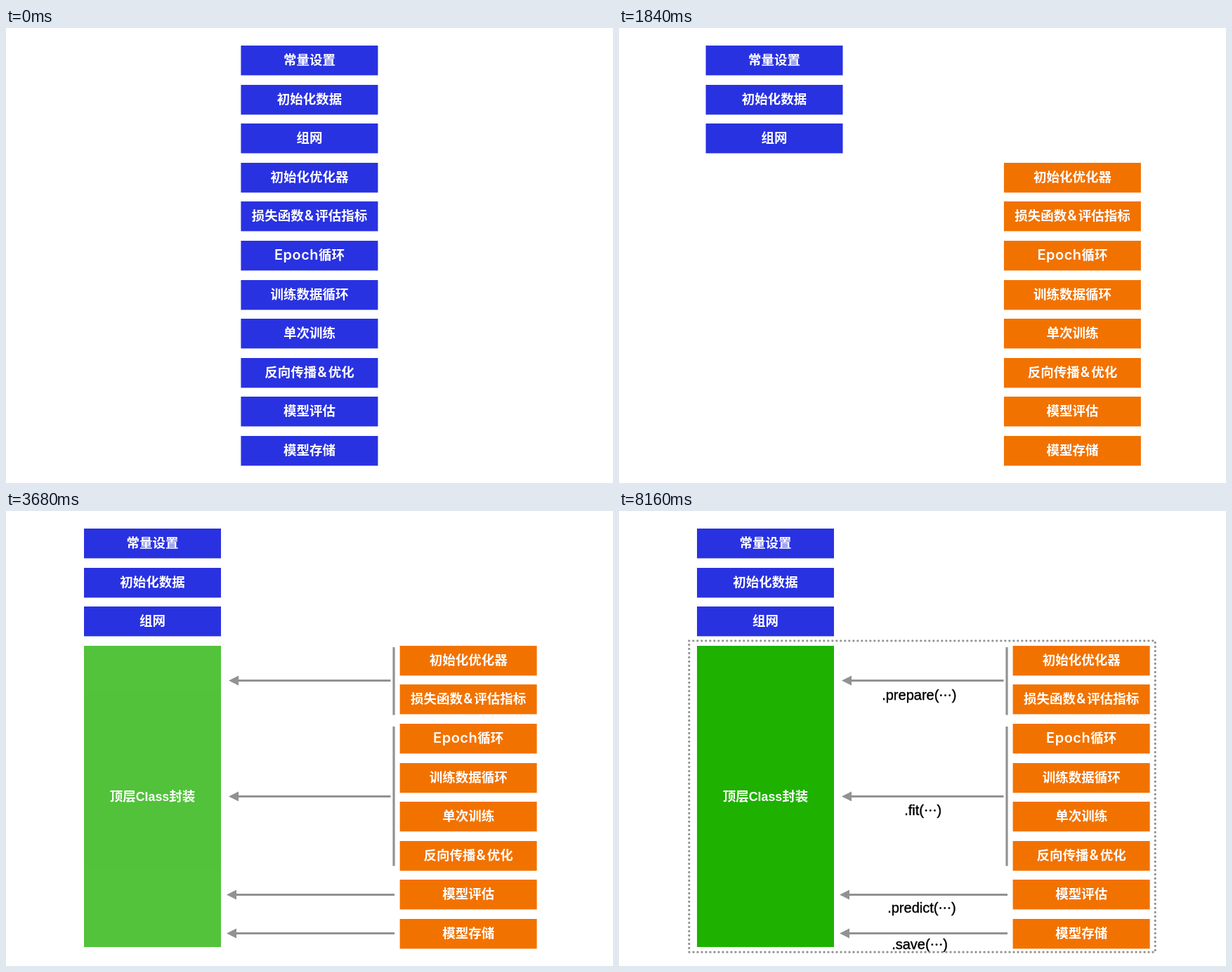
An HTML page that plays this animation: 864 by 648 pixels, repeating every 8680 ms.

```html
<!DOCTYPE html>
<html lang="zh-CN">
<head>
<meta charset="utf-8">
<title>训练流程封装</title>
<style>
  html, body { margin: 0; width: 100%; height: 100%; overflow: hidden; background: #fff; }
  svg { display: block; width: 864px; height: 648px; }
  text { font: 700 18.5px "Noto Sans CJK SC", "Noto Sans CJK", sans-serif; }
  .title { fill: #fff; text-anchor: middle; }
  .latin { font: 600 20px Inter, sans-serif; letter-spacing: .5px; }
  .amp { font: 600 20px Inter, sans-serif; letter-spacing: 2px; }
  .class { font: 700 17.8px "Liberation Sans", Arial, sans-serif; }
  .call { font: 400 20px "Liberation Sans", Arial, sans-serif; stroke: #000; stroke-width: .4px; }
  .dots { font: 700 18.5px "Noto Sans CJK SC", "Noto Sans CJK", sans-serif; stroke: none; }
</style>
</head>
<body>
<svg id="stage" viewBox="0 0 864 648" xmlns="http://www.w3.org/2000/svg"></svg>
<script>
const LOOP = 8680, STEP = 40, STEPS = 12;
const BLUE = '#2932e1', ORANGE = '#f27200', GREEN = '#1eb100', GRAY = '#929292';
const START = { recolor: 520, split: 1480, arrows: 2440, wrap: 3400, calls: 4360, frame: 5320 };
const BOX = { x: 334.4, w: 195, h: 42.4 };
const titles = ['常量设置', '初始化数据', '组网', '初始化优化器', '损失函数&评估指标', 'Epoch循环',
  '训练数据循环', '单次训练', '反向传播&优化', '模型评估', '模型存储'];
const stage = document.getElementById('stage');

function add(parent, tag, attrs = {}, content) {
  const el = document.createElementNS('http://www.w3.org/2000/svg', tag);
  for (const key in attrs) el.setAttribute(key, attrs[key]);
  if (content) el.textContent = content;
  parent.appendChild(el);
  return el;
}

// Text whose Latin runs get their own font class
function addTitle(parent, x, y, str, latin = 'latin') {
  const text = add(parent, 'text', { x, y, class: 'title' });
  for (const run of str.split(/([A-Za-z]+|&)/).filter(Boolean)) {
    const attrs = run === '&' ? { class: 'amp', dx: 1 } : /[a-z]/i.test(run) ? { class: latin } : {};
    add(text, 'tspan', attrs, run);
  }
}

// Group revealed through a moving clip edge
function addWipe(id, x, w, fromRight = false) {
  const clip = add(stage, 'clipPath', { id });
  const rect = add(clip, 'rect', { x, y: 0, width: 0, height: 648 });
  const group = add(stage, 'g', { 'clip-path': `url(#${id})` });
  const set = p => {
    rect.setAttribute('width', w * p);
    if (fromRight) rect.setAttribute('x', x + w * (1 - p));
  };
  return { group, set };
}

const boxTop = i => Math.round(25 + 55.6 * i);
const addBox = (parent, i, fill) =>
  add(parent, 'rect', { x: BOX.x, y: boxTop(i), width: BOX.w, height: BOX.h, fill });

// Stacked boxes
const upper = add(stage, 'g');
const lower = add(stage, 'g');
const lowerBlue = add(lower, 'g');
const recolor = addWipe('recolor', BOX.x - 1, BOX.w + 2);
lower.appendChild(recolor.group);
const lowerText = add(lower, 'g');
titles.forEach((title, i) => {
  const isUpper = i < 3;
  addBox(isUpper ? upper : lowerBlue, i, BLUE);
  if (!isUpper) addBox(recolor.group, i, ORANGE);
  addTitle(isUpper ? upper : lowerText, 432, boxTop(i) + 27.3, title);
});

// Arrows, two of them with a bracket bar: tip x, y, tail x, bar top, bar bottom
const arrows = [
  [317, 241.5, 547.5, 194, 290.5],
  [317, 406.5, 547.5, 307, 505.5],
  [314, 546.5, 553],
  [314, 601.5, 553]
].map(([tip, y, tail, top, bottom], i) => {
  const wipe = addWipe('arrow' + i, 313, 242, true);
  const line = { stroke: GRAY, 'stroke-width': 3.2, fill: 'none' };
  add(wipe.group, 'path', { d: `M${tip + 12} ${y}H${tail}`, ...line });
  add(wipe.group, 'path', { d: `M${tip} ${y}l14 -7v14z`, fill: GRAY });
  if (top) add(wipe.group, 'path', { d: `M552 ${top}V${bottom}`, ...line });
  return wipe;
});

// Green wrapper
const wrap = add(stage, 'g');
add(wrap, 'rect', { x: 111, y: 192, width: BOX.w, height: 429, fill: GREEN });
addTitle(wrap, 208.5, 413.3, '顶层Class封装', 'class');

// Method calls: name, x, baseline, width
const calls = [
  ['prepare', 374.2, 269, 107],
  ['fit', 406.2, 432.5, 54],
  ['predict', 382.2, 571.5, 99],
  ['save', 388.2, 623.5, 79]
].map(([name, x, y, w], i) => {
  const wipe = addWipe('call' + i, x - 4, w + 8);
  const text = add(wipe.group, 'text', { x, y, class: 'call' });
  add(text, 'tspan', {}, `.${name}(`);
  add(text, 'tspan', { class: 'dots' }, '⋯');
  add(text, 'tspan', {}, ')');
  return wipe;
});

// Dotted frame
const frame = add(stage, 'rect', {
  x: 99.8, y: 184.8, width: 663.4, height: 443.4, fill: 'none', stroke: GRAY,
  'stroke-width': 3.3, 'stroke-linecap': 'round', 'stroke-dasharray': '0 6'
});

// Same curve as CSS ease-in-out
function easeInOut(x) {
  let lo = 0, hi = 1;
  for (let i = 0; i < 24; i++) {
    const s = (lo + hi) / 2, r = 1 - s;
    if (1.26 * s * r * r + 1.74 * s * s * r + s * s * s < x) lo = s; else hi = s;
  }
  return x >= 1 ? 1 : lo * lo * (3 - 2 * lo);
}

function render(time) {
  const t = Math.floor((time % LOOP) / STEP) * STEP;
  const progress = start => Math.min(1, Math.max(0, ((t - start) / STEP + 1) / STEPS));
  const fade = start => {
    const p = easeInOut(progress(start));
    return p < .1 ? 0 : p;
  };

  const recolored = progress(START.recolor);
  recolor.set(recolored);
  lowerBlue.setAttribute('visibility', recolored < 1 ? 'visible' : 'hidden');

  const split = easeInOut(progress(START.split));
  upper.setAttribute('transform', `translate(${-223.4 * split} 0)`);
  lower.setAttribute('transform', `translate(${226.2 * split} 0)`);

  arrows.forEach(a => a.set(progress(START.arrows)));
  calls.forEach(c => c.set(progress(START.calls)));
  wrap.setAttribute('opacity', fade(START.wrap));
  frame.setAttribute('opacity', fade(START.frame));
}

const origin = performance.now();
function tick() {
  render(performance.now() - origin);
  requestAnimationFrame(tick);
}
render(0);
requestAnimationFrame(tick);
</script>
</body>
</html>
```
